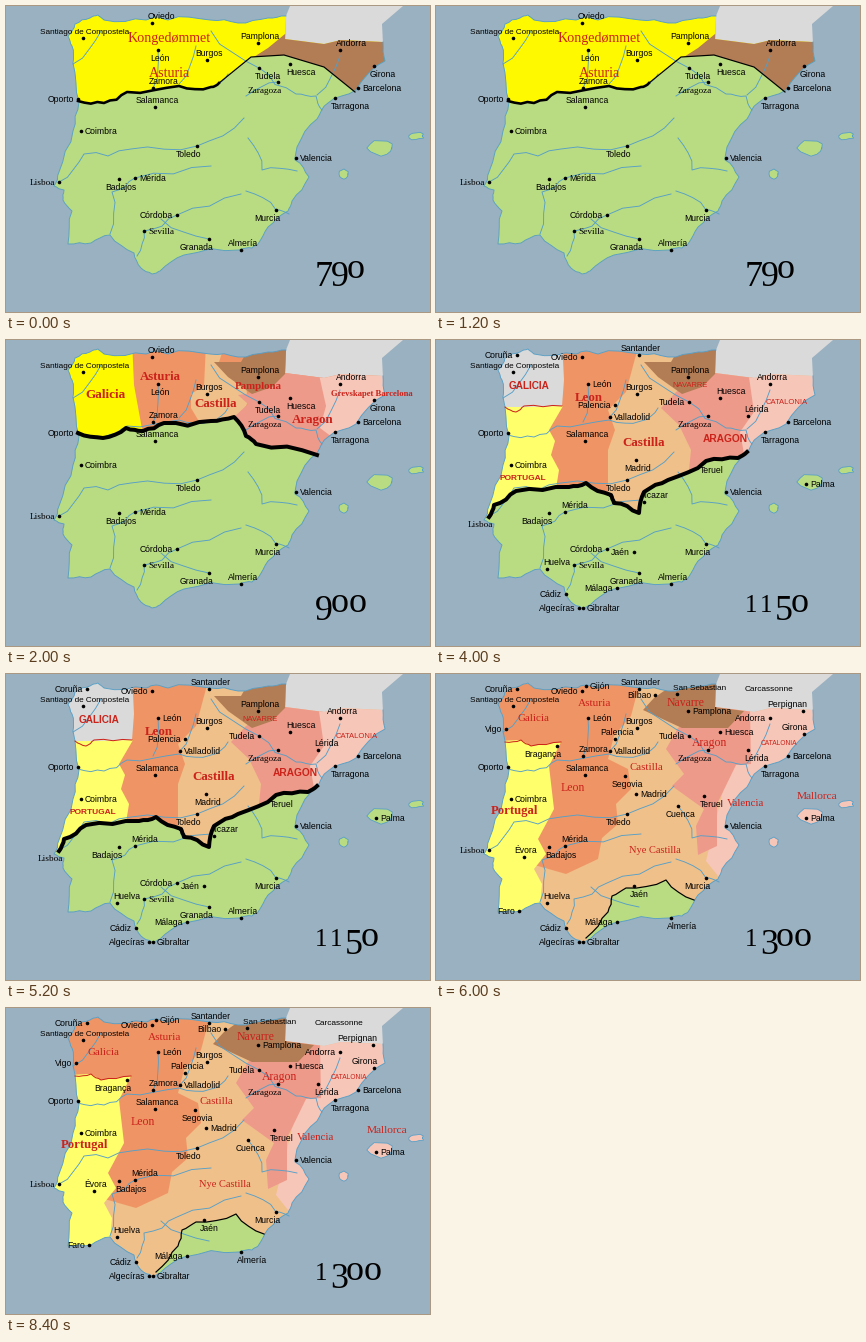
Write a matplotlib script that moves like this. It is 424 px wide and 306 px high and loops after 10 s.

```python
import math
import random

import matplotlib.pyplot as plt
from matplotlib.animation import FuncAnimation
from matplotlib.patches import Polygon

W, H, DPI = 424, 306, 100
PX = 72 / DPI

SEA, GREEN, GRAY = "#9AB1C1", "#B9DB82", "#DADADA"
YELLOW, LEMON, ORANGE, PEACH = "#FFF900", "#FFFF6C", "#EF9565", "#F0C08A"
BROWN, ROSE, PINK = "#B27C55", "#EE9A8A", "#F6C6B8"
RIVER, RED = "#559FC8", "#CB221A"
SERIFED = {"Lisboa", "Sevilla", "Zaragoza"}

TOWNS = {
    "Santiago de Compostela": (77, 32), "Oviedo": (146, 17), "León": (152, 44),
    "Burgos": (201, 54), "Pamplona": (252, 37), "Zamora": (147, 82),
    "Salamanca": (149, 101), "Tudela": (253, 62), "Huesca": (284, 58),
    "Zaragoza": (272, 76), "Andorra": (334, 44), "Girona": (368, 60),
    "Barcelona": (352, 82), "Tarragona": (329, 92), "Oporto": (72, 93),
    "Coimbra": (75, 125), "Toledo": (191, 140), "Mérida": (129, 172),
    "Badajos": (113, 173), "Lisboa": (53, 176), "Valencia": (290, 152),
    "Córdoba": (171, 209), "Sevilla": (138, 225), "Murcia": (270, 204),
    "Granada": (203, 233), "Almería": (235, 244), "Coruña": (81, 15),
    "Santander": (203, 15), "Palencia": (179, 65), "Valladolid": (174, 77),
    "Lérida": (312, 76), "Madrid": (200, 120), "Teruel": (268, 122),
    "Alcazar": (208, 162), "Jaén": (198, 212), "Huelva": (111, 229),
    "Málaga": (181, 248), "Cádiz": (130, 254), "Algecíras": (143, 268),
    "Gibraltar": (147, 268), "Palma": (370, 144), "Gijón": (150, 12),
    "Bilbao": (219, 21), "San Sebastian": (241, 20), "Perpignan": (367, 37),
    "Vigo": (70, 55), "Bragança": (121, 72), "Segovia": (189, 102),
    "Cuenca": (242, 132), "Évora": (88, 183), "Faro": (83, 237),
}

fig = plt.figure(figsize=(W / DPI, H / DPI), dpi=DPI, facecolor=SEA)
ax = fig.add_axes([0, 0, 1, 1])
ax.set(xlim=(0, W), ylim=(H, 0))
ax.axis("off")


def roughen(points, amount=0.09, rounds=2):
    """Repeatedly split segments at sideways displaced midpoints."""
    rng = random.Random(4)
    for _ in range(rounds):
        result = [points[0]]
        for (x0, y0), (x1, y1) in zip(points, points[1:]):
            k = rng.uniform(-amount, amount)
            result.append(((x0 + x1) / 2 + k * (y1 - y0),
                           (y0 + y1) / 2 - k * (x1 - x0)))
            result.append((x1, y1))
        points = result
    return points


def island(cx, cy, rx, ry):
    rng = random.Random(cx)
    ring = []
    for i in range(12):
        angle, r = i * math.tau / 12, rng.uniform(0.75, 1.1)
        ring.append((cx + rx * r * math.cos(angle),
                     cy + ry * r * math.sin(angle)))
    return ring + ring[:1]


NORTH = [(62, 30), (69, 18), (84, 12), (92, 9), (98, 14), (140, 14), (150, 11),
         (162, 14), (204, 14), (232, 17), (262, 12), (280, 10)]
EAST = [(377, 36), (379, 55), (350, 84), (322, 97), (311, 113), (291, 141),
        (289, 154), (303, 171), (286, 195), (282, 205), (262, 221), (252, 238),
        (246, 242)]
SOUTH = [(233, 244), (178, 249), (154, 265), (146, 268), (135, 262),
         (128, 247), (104, 229), (85, 237), (62, 238)]
WEST = [(66, 205), (57, 194), (58, 184), (48, 180), (53, 166), (67, 125),
        (73, 96), (67, 57), (66, 40)]
COAST = roughen(EAST + SOUTH + WEST + NORTH)
LAND = COAST + [(279, 33), (318, 38), (335, 34)]
FRANCE = [(284, 0), (280, 10), (279, 38), (377, 38), (376, 18), (397, 0)]
ISLANDS = [island(375, 142, 13, 8), island(410, 130, 8, 4),
           island(338, 168, 5, 5)]
DUERO = [(72, 95), (98, 97), (121, 86), (173, 80), (205, 81), (222, 68)]
TAGUS = [(53, 176), (78, 148), (125, 143), (191, 140), (238, 112)]
GUADIANA = [(104, 228), (106, 186), (129, 172), (205, 160)]
GUADALQUIVIR = [(131, 250), (138, 225), (171, 209), (235, 188)]
EBRO = [(205, 25), (253, 62), (290, 88), (310, 90), (316, 104)]
JUCAR = [(291, 165), (256, 164), (242, 132)]
SEGURA = [(283, 208), (270, 204), (240, 185)]
TRIBUTARIES = [[(67, 58), (95, 25)], [(147, 82), (152, 44)],
               [(173, 78), (190, 40)], [(272, 76), (240, 90)],
               [(311, 89), (334, 50)], [(155, 213), (203, 233)]]
RIVERS = [DUERO, TAGUS, GUADIANA, GUADALQUIVIR, EBRO, JUCAR, SEGURA]

NAVARRE = BROWN, [(208, 22), (235, 22), (245, 5), (285, 5), (279, 34),
                  (266, 47), (246, 54), (222, 37)]


def below(line):
    return line + [(W, line[-1][1]), (W, H), (0, H), (0, line[0][1])]


def area(points, color, z=1, clip=None):
    patch = ax.add_patch(Polygon(points, fc=color, ec="none", zorder=z))
    if clip:
        patch.set_clip_path(clip)
    return patch


def stroke(points, color, width, z=3):
    return ax.plot(*zip(*points), color=color, lw=width * PX, zorder=z)[0]


def write(text, x, y, size, style="sans", color="black", align="left"):
    family = "Liberation Sans" if "sans" in style else "Liberation Serif"
    weight = "bold" if "bold" in style else "normal"
    return ax.text(x, y + 0.36 * size, text, fontsize=size * PX, color=color,
                   family=family, weight=weight, ha=align, zorder=6)


def write_town(name, side):
    """Place a label on the given compass side of its town."""
    x, y = TOWNS[name]
    rise = -7 if "n" in side else 7.5 if "s" in side else 0
    reach = -4 if rise else 4
    align = "left" if "e" in side else "right" if "w" in side else "center"
    shift = {"left": reach, "right": -reach, "center": 2}[align]
    serif = name in SERIFED
    size = 9.3 if serif else 8.2 if len(name) > 10 else 8.6
    return write(name, x + shift, y + rise, size,
                 "serif" if serif else "sans", align=align)


def write_year(year):
    """Old-style figures: 0 and 1 at x-height, the others hang below."""
    advance = {"0": 17.3, "1": 15, "7": 15.5}
    x, artists = 309, []
    for digit in year:
        glyph, size, base = {"0": ("o", 36, 272.5), "1": ("1", 25, 272.5)}.get(
            digit, (digit, 36, 280.5))
        artists.append(write(glyph, x, base - 0.36 * size, size, "serif"))
        x += advance.get(digit, 16)
    return artists


def build(year, base, isles, regions, fronts, titles, towns, border=None):
    land = area(LAND, base, 1.1)
    artists = [area(FRANCE, GRAY), land, stroke(COAST, RIVER, 0.9)]
    artists += [area(points, color, 2, land) for color, points in regions]
    for ring in ISLANDS:
        artists += [area(ring, isles), stroke(ring, RIVER, 0.8)]
    for river in RIVERS + TRIBUTARIES:
        artists.append(stroke(roughen(river, 0.12), RIVER, 0.9))
    if border:
        artists.append(stroke(roughen(border), RED, 1, 4))
    for width, line in fronts:
        artists.append(stroke(line, "black", width, 4))
    for text, x, y, size, style in titles:
        artists.append(write(text, x, y, size, style, RED))
    dots = []
    for side, names in towns.items():
        for name in names.split(", "):
            artists.append(write_town(name, side))
            dots.append(TOWNS[name])
    artists.append(ax.scatter(*zip(*dots), s=(3.6 * PX) ** 2, c="black",
                              linewidths=0, zorder=5))
    return artists + write_year(year)


def map_790():
    west = roughen(DUERO[:-1] + [(213, 77)], 0.12)
    east = [(213, 77), (245, 51), (278, 49), (318, 61), (349, 86)]
    return build(
        "790", YELLOW, GREEN,
        [(BROWN, [(279, 28), (390, 28), (390, 110), (240, 56), (262, 42)]),
         (GREEN, below(west + east))],
        [(2.6, west), (1.2, east)],
        [("Kongedømmet", 122, 31, 14, "serif"),
         ("Asturia", 143, 66, 14, "serif")],
        EARLY_TOWNS)


def map_900():
    front = roughen([(72, 93), (97, 98), (120, 88), (137, 91), (158, 83),
                     (205, 81), (228, 77), (240, 96), (250, 104), (311, 115)])
    return build(
        "900", ORANGE, GREEN,
        [(YELLOW, [(50, 0), (126, 0), (128, 45), (138, 100), (50, 100)]),
         (PEACH, [(200, 5), (217, 10), (212, 25), (240, 45), (242, 62),
                  (230, 85), (197, 88), (185, 68), (185, 54), (198, 46)]),
         (ROSE, [(232, 55), (246, 53), (279, 30), (318, 35), (320, 70),
                 (335, 120), (228, 120), (228, 77), (242, 64)]),
         (PINK, [(312, 30), (390, 30), (390, 110), (330, 100), (314, 88),
                 (320, 66)]),
         NAVARRE, (GREEN, below(front))],
        [(4, front)],
        [("Galicia", 79, 53, 13.3, "bold"),
         ("Asturia", 134, 35, 12.7, "bold"),
         ("Castilla", 188, 62, 13, "bold"),
         ("Aragon", 286, 78, 13, "bold"),
         ("Pamplona", 229, 45, 10.9, "bold"),
         ("Grevskapet Barcelona", 325, 53, 8.7, "bold")],
        EARLY_TOWNS)


def map_1150():
    front = roughen([(53, 177), (58, 165), (80, 151), (133, 147), (150, 143),
                     (175, 155), (178, 163), (203, 173), (208, 152),
                     (232, 140), (270, 121), (302, 118), (311, 112)])
    return build(
        "1150", PEACH, GREEN,
        [(ROSE, [(225, 68), (240, 52), (279, 30), (318, 35), (320, 130),
                 (253, 130), (255, 110), (243, 85)]),
         (ORANGE, [(110, 0), (204, 0), (190, 52), (172, 70), (179, 90),
                   (172, 110), (172, 160), (110, 160)]),
         (LEMON, [(40, 60), (127, 66), (113, 90), (119, 101), (115, 115),
                  (123, 130), (119, 155), (40, 180)]),
         (GRAY, [(50, 0), (126, 0), (128, 40), (126, 66), (88, 67), (50, 67)]),
         (PINK, [(312, 30), (390, 30), (390, 130), (311, 130), (304, 92),
                 (318, 72)]),
         NAVARRE, (GREEN, below(front))],
        [(4, front)],
        [("GALICIA", 73, 45, 10, "sans bold"),
         ("Leon", 139, 56, 12.9, "bold"),
         ("Castilla", 186, 101, 13, "bold"),
         ("NAVARRE", 236, 44, 7.5, "sans"),
         ("ARAGON", 267, 98, 10.3, "sans bold"),
         ("CATALONIA", 330, 61, 7.6, "sans"),
         ("PORTUGAL", 63, 137, 8.4, "sans bold")],
        dict(n="Santander, Santiago de Compostela, Burgos, Pamplona, Andorra, "
               "Salamanca, Almería",
             ne="Huesca, Lérida, Alcazar, Mérida, Huelva",
             e="León, Valladolid, Barcelona, Coimbra, Valencia, Sevilla, "
               "Gibraltar, Palma",
             se="Tarragona, Teruel", s="Madrid",
             sw="Zaragoza, Toledo, Badajos, Murcia, Granada, Lisboa",
             w="Coruña, Oviedo, Palencia, Tudela, Oporto, Córdoba, Jaén, "
               "Málaga, Cádiz, Algecíras"),
        [(69, 67), (80, 72), (88, 66), (126, 66)])


def map_1300():
    front = roughen([(150, 264), (172, 238), (176, 222), (190, 214),
                     (230, 206), (258, 226)])
    artists = build(
        "1300", PEACH, PINK,
        [(ORANGE, [(50, 0), (206, 0), (195, 42), (178, 62), (172, 85),
                   (192, 95), (195, 115), (180, 130), (182, 150), (166, 164),
                   (162, 185), (130, 200), (95, 190), (100, 80), (50, 68)]),
         (LEMON, [(40, 68), (85, 66), (95, 72), (125, 68), (113, 92),
                  (118, 135), (102, 165), (110, 180), (98, 195), (106, 210),
                  (103, 245), (40, 245)]),
         (PINK, [(310, 30), (390, 30), (390, 110), (310, 180), (286, 207),
                 (270, 187), (290, 104)]),
         (ROSE, [(230, 75), (242, 54), (279, 30), (314, 36), (315, 90),
                 (300, 91), (281, 130), (281, 172), (262, 181), (260, 152),
                 (268, 135), (236, 112), (248, 100)]),
         (BROWN, [(218, 24), (245, 5), (285, 5), (279, 33), (308, 37),
                  (292, 54), (246, 54), (207, 36)]),
         (GREEN, front + [(260, 255), (160, 275)])],
        [(1.2, front)],
        [("Galicia", 82, 43, 11, "serif"),
         ("Asturia", 142, 28, 11.2, "serif"),
         ("Navarre", 231, 28, 11.8, "serif"),
         ("Aragon", 256, 68, 11.7, "serif"),
         ("Castilla", 194, 92, 10.9, "serif"),
         ("Leon", 125, 113, 11.7, "serif"),
         ("Portugal", 55, 135, 12.7, "bold"),
         ("Valencia", 291, 128, 10.8, "serif"),
         ("Mallorca", 361, 121, 11.4, "serif"),
         ("Nye Castilla", 193, 175, 10.4, "serif"),
         ("CATALONIA", 325, 69, 6.6, "sans")],
        dict(n="Santiago de Compostela, Santander, Burgos, Palencia, "
               "Salamanca, Évora",
             ne="San Sebastian, Zamora, Mérida, Huelva",
             nw="Perpignan, Girona",
             e="Gijón, Pamplona, Huesca, Barcelona, León, Valladolid, Madrid, "
               "Coimbra, Valencia, Palma, Gibraltar",
             se="Lérida, Tarragona, Teruel, Badajos, Jaén, Almería",
             s="Segovia, Cuenca",
             sw="Zaragoza, Bragança, Toledo, Murcia",
             w="Coruña, Oviedo, Bilbao, Andorra, Vigo, Tudela, Oporto, "
               "Lisboa, Málaga, Faro, Cádiz, Algecíras"),
        [(69, 68), (85, 66), (95, 72), (125, 68)])
    return artists + [write("Carcassonne", 309, 14, 8.3)]


EARLY_TOWNS = dict(
    n="Santiago de Compostela, Burgos, Pamplona, Salamanca, Almería",
    ne="Oviedo, Zamora, Andorra",
    e="Barcelona, Coimbra, Mérida, Valencia, Sevilla",
    se="Tudela, Huesca, Girona, Tarragona", s="León, Badajos",
    sw="Zaragoza, Toledo, Murcia, Granada",
    w="Oporto, Lisboa, Córdoba")

maps = [map_790(), map_900(), map_1150(), map_1300()]


def update(step):
    current = min(step, len(maps) - 1)
    for index, artists in enumerate(maps):
        for artist in artists:
            artist.set_visible(index == current)
    return maps[current]


anim = FuncAnimation(fig, update, frames=5, interval=2000,
                     init_func=lambda: update(0), repeat=True, repeat_delay=0)
plt.show()
```
